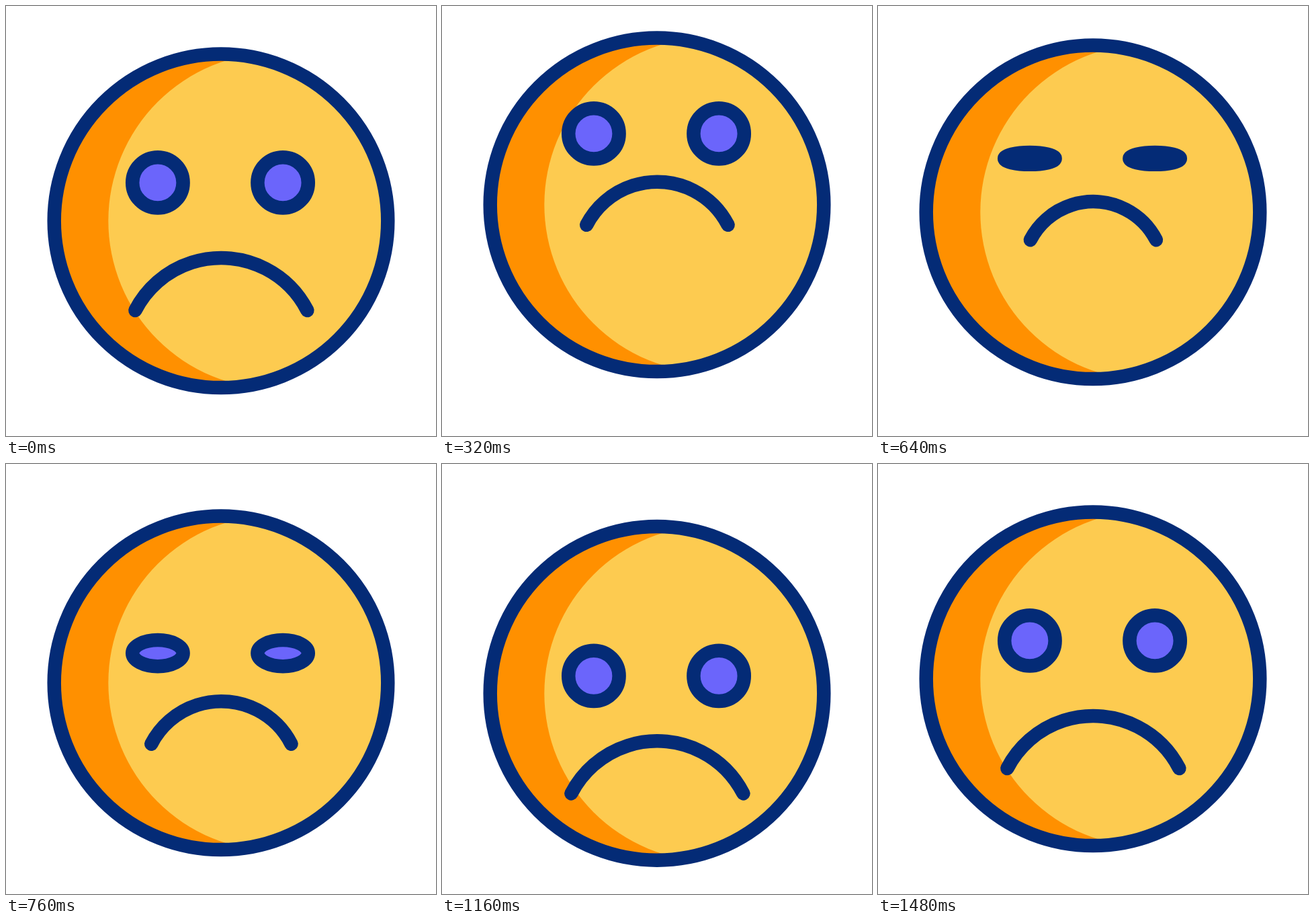
Animation, 640 px wide and 640 px high, one loop 2 s. Source, as an HTML page with a canvas:

```html
<!DOCTYPE html>
<html lang="en">
<head>
<meta charset="utf-8">
<title>Sad face</title>
<style>
  html, body { margin: 0; width: 100%; height: 100%; overflow: hidden; background: #fff; }
  canvas { display: block; width: 640px; height: 640px; }
</style>
</head>
<body>
<canvas id="stage" width="640" height="640"></canvas>
<script>
const ctx = document.getElementById('stage').getContext('2d');
const LOOP = 2000, STEP = 40;
const TOP = 480, BOTTOM = 960, REST = 1480;
const NAVY = '#042b76', ORANGE = '#ff9000', YELLOW = '#fdcb50', PURPLE = '#6b65fb';

// Blend of linear and smoothstep, running from 0 to 1 between two times.
function ease(t, start, end, softness = 0.2) {
  const p = Math.min(1, Math.max(0, (t - start) / (end - start)));
  return p + softness * (p * p * (3 - 2 * p) - p);
}

// Up, down and back to rest; a part with a lead arrives that much earlier.
function nod(t, up, down, lead) {
  return -up * ease(t, 0, TOP - lead)
    + (up + down) * ease(t, TOP, BOTTOM - lead)
    - down * ease(t, BOTTOM, REST - lead);
}

// Falls from 1 to low at mid, then returns to 1.
function dip(t, start, mid, end, low) {
  return 1 - (1 - low) * (ease(t, start, mid, 0.65) - ease(t, mid, end, 0.65));
}

function ellipse(x, y, rx, ry) {
  ctx.beginPath();
  ctx.ellipse(x, y, rx, ry, 0, 0, Math.PI * 2);
}

function fill(color) {
  ctx.fillStyle = color;
  ctx.fill();
}

function drawHead(y) {
  const radius = 248.3;
  ellipse(320, y, radius, radius);
  fill(ORANGE);
  ctx.save();
  ctx.clip();
  ellipse(402.3, y, 250, 250);
  fill(YELLOW);
  ctx.restore();
  ellipse(320, y, radius, radius);
  ctx.stroke();
}

function drawEyes(y, open) {
  const radius = 37.7;
  for (const side of [-1, 1]) {
    ellipse(319 + side * 93.1, y, radius, radius * open);
    fill(PURPLE);
    ctx.stroke();
  }
}

function drawMouth(y, scale) {
  const spread = Math.asin(128 / 144), up = -Math.PI / 2;
  ctx.beginPath();
  ctx.arc(320.4, y + 105 * scale, 144 * scale, up - spread, up + spread);
  ctx.stroke();
}

function draw(t) {
  ctx.fillStyle = '#fff';
  ctx.fillRect(0, 0, 640, 640);
  ctx.strokeStyle = NAVY;
  ctx.lineWidth = 20.5;
  ctx.lineCap = 'round';

  drawHead(319.8 + nod(t, 35.2, 34.5, 0));
  drawEyes(262.9 + nod(t, 100.2, 87.4, 30), dip(t, 530, 670, 860, 0.1));
  drawMouth(414 + nod(t, 170.8, 60.8, 15), dip(t, 0, 560, 1050, 0.7));
}

function tick() {
  const t = (performance.now() + 4) % LOOP;
  draw(Math.floor(t / STEP) * STEP);
  requestAnimationFrame(tick);
}
tick();
</script>
</body>
</html>
```
